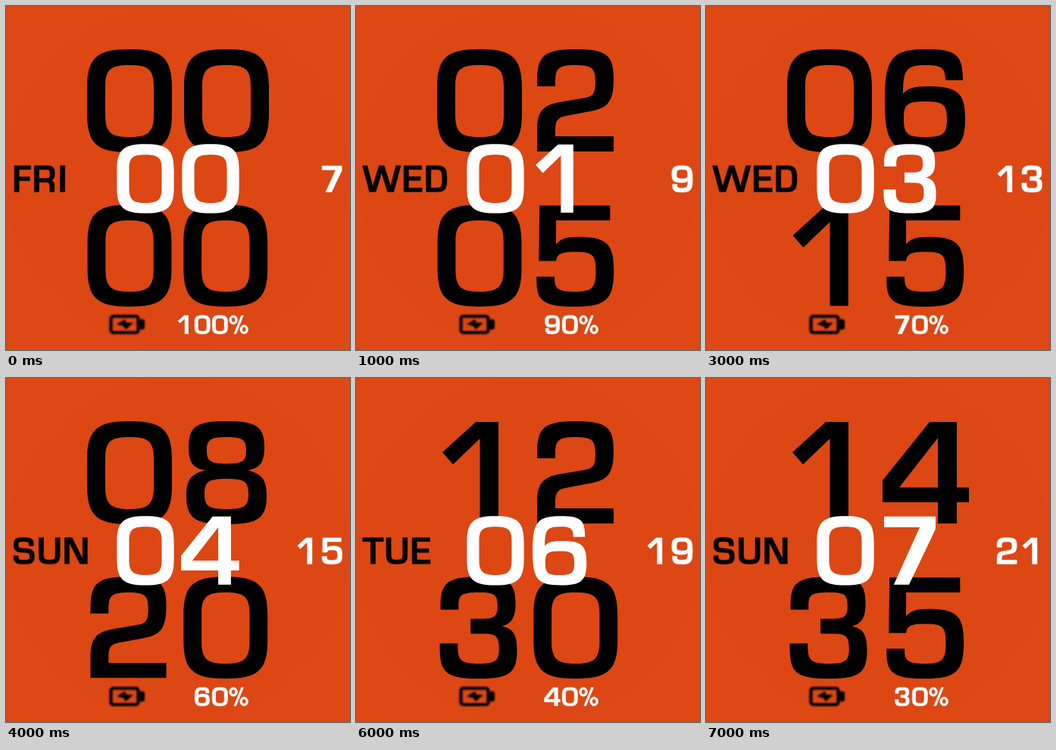
An HTML page with a canvas that plays this animation: 454x454 px, repeating every 8000 ms.

```html
<!DOCTYPE html>
<html lang="en">
<head>
<meta charset="utf-8">
<title>Watch face</title>
<style>
  html, body { margin: 0; height: 100%; overflow: hidden; background: #de4814; }
  canvas { display: block; }
</style>
</head>
<body>
<canvas id="face" width="454" height="454" role="img"></canvas>
<script>
const canvas = document.getElementById('face');
const ctx = canvas.getContext('2d');

// Glyph outlines: cap height 134, default advance 128.
const outlines = {
  0: 'M64-1C107-1 120 10 120 50V84C120 124 107 135 64 135C21 135 8 124 8 84V50C8 10 21-1 64-1ZM64 20C40 20 32 25 32 48V86C32 109 40 115 64 115C88 115 96 109 96 86V48C96 25 88 20 64 20Z',
  1: 'M59 0H89V134H64.5V22L29 56 15 40Z',
  2: 'M12 48V42C12 8 20-1 63-1C104-1 113 7 113 38C113 70 104 77 82 81L50 87C39 89 36 94 36 105V114H113V134H12V106C12 82 19 73 41 69L76 63C86 61 89 57 89 42C89 24 84 20 63 20C40 20 36 24 36 43V48Z',
  3: 'M12 43V38C12 8 20-1 63-1C103-1 112 7 112 35C112 53 107 62 94 65C109 68 114 77 114 97C114 127 104 135 63 135C20 135 11 127 11 94V88H35V92C35 111 40 115 63 115C85 115 90 111 90 95C90 79 86 75 70 75H52V55H70C84 55 88 51 88 38C88 23 84 20 63 20C40 20 36 23 36 38V43Z',
  4: 'M68 0H104V86.5H120V106H104V134H79V106H6V77ZM79 21L28 86.5H79Z',
  5: 'M16 0H110V20H38V52C43 45 51 42 68 42C104 42 115 50 115 86C115 126 105 135 63 135C21 135 12 127 12 100V95H36V97C36 111 41 115 63 115C86 115 91 110 91 88C91 66 87 62 64 62C45 62 40 64 38 74H15Z',
  6: 'M89 40C89 24 84 20 64 20C38 20 33 25 33 58C38 51 47 48 66 48C106 48 115 57 115 91C115 126 105 135 64 135C19 135 9 124 9 67C9 10 19-1 64-1C103-1 112 6 112 40ZM62 68C38 68 34 72 34 91C34 111 39 115 62 115C86 115 91 111 91 91C91 72 86 68 62 68Z',
  7: 'M12 0H113V25L61 134H31L82 21H12Z',
  8: 'M64-1C104-1 114 6 114 34C114 52 109 61 92 64C111 68 117 77 117 97C117 127 106 135 64 135C22 135 11 127 11 97C11 77 17 68 36 64C19 61 14 52 14 34C14 6 24-1 64-1ZM64 20C43 20 38 23 38 38C38 52 43 55 64 55C85 55 90 52 90 38C90 23 85 20 64 20ZM64 75C40 75 35 79 35 95C35 111 40 115 64 115C88 115 93 111 93 95C93 79 88 75 64 75Z',
  9: 'M37 94C37 110 42 114 62 114C88 114 93 109 93 76C88 83 79 86 60 86C20 86 11 77 11 43C11 8 21-1 62-1C107-1 117 10 117 67C117 124 107 135 62 135C23 135 14 128 14 94ZM64 66C88 66 92 62 92 43C92 23 87 19 64 19C40 19 35 23 35 43C35 62 40 66 64 66Z',
  '%': 'M4 32a30 33 0 1 0 60 0a30 33 0 1 0-60 0ZM20 32a14 18 0 1 0 28 0a14 18 0 1 0-28 0ZM82 102a30 33 0 1 0 60 0a30 33 0 1 0-60 0ZM98 102a14 18 0 1 0 28 0a14 18 0 1 0-28 0ZM92 0H108L54 134H38Z',
  D: 'M12 0H64C108 0 118 12 118 67C118 122 108 134 64 134H12ZM36 20V114H62C88 114 94 108 94 67C94 26 88 20 62 20Z',
  E: 'M12 0H103V20H36V56H97V76H36V114H105V134H12Z',
  F: 'M12 0H96V20H36V57H90V77H36V134H12Z',
  I: 'M12 0H36V134H12Z',
  N: 'M12 0H50L104 108V0H128V134H90L36 26V134H12Z',
  R: 'M12 0H74C106 0 116 8 116 38C116 64 111 72 94 75C110 78 115 85 115 104V134H91V109C91 90 87 85 70 85H36V134H12ZM36 20V65H72C88 65 92 61 92 42C92 23 88 20 72 20Z',
  S: 'M110 42H87V38C87 23 82 20 60 20C36 20 32 23 32 36C32 52 38 54 62 55C104 57 114 64 114 96C114 127 104 135 61 135C18 135 8 127 8 98V92H32V97C32 112 37 115 61 115C86 115 90 112 90 97C90 80 86 77 61 76C18 74 9 68 9 37C9 6 18-1 60-1C101-1 110 7 110 36Z',
  T: 'M3 0H109V20H68V134H44V20H3Z',
  U: 'M12 0H36V82C36 109 41 114 66 114C91 114 96 109 96 82V0H120V84C120 126 108 135 66 135C24 135 12 126 12 84Z',
  W: 'M2 0H27L54 106 87 0H113L146 106 173 0H198L162 134H130L100 36 70 134H38Z'
};
const glyphs = {};
for (const key in outlines) glyphs[key] = new Path2D(outlines[key]);
const advances = { '%': 148, D: 128, E: 114, F: 102, I: 48, N: 140, R: 132, S: 125, T: 112, U: 132, W: 202 };
const advance = c => advances[c] || 128;

// align: 0 = left, 0.5 = centre, 1 = right; weight thickens small text
function write(text, x, top, scale, color, align, weight = 0) {
  const width = [...text].reduce((sum, c) => sum + advance(c), 0);
  ctx.save();
  ctx.translate(x - width * scale * align, top);
  ctx.scale(scale, scale);
  ctx.fillStyle = ctx.strokeStyle = color;
  ctx.lineWidth = weight;
  for (const c of text) {
    ctx.fill(glyphs[c], 'evenodd');
    if (weight) ctx.stroke(glyphs[c]);
    ctx.translate(advance(c), 0);
  }
  ctx.restore();
}

function background() {
  ctx.fillStyle = '#de4814';
  ctx.fillRect(0, 0, 454, 454);
  ctx.fillStyle = '#dc4714';
  ctx.beginPath();
  ctx.arc(227, 227, 226, 0, 2 * Math.PI);
  ctx.fill();
}

function battery() {
  ctx.save();
  ctx.filter = 'blur(1px)';
  ctx.strokeStyle = ctx.fillStyle = '#000';
  ctx.lineWidth = 4.2;
  ctx.beginPath();
  ctx.roundRect(138.5, 409.5, 36, 21.5, 3);
  ctx.stroke();
  ctx.beginPath();
  ctx.roundRect(175, 413.5, 8, 13.5, 3);
  ctx.fill();
  ctx.fill(new Path2D('M146 420L157 413.5L159 418H168L158 427L155 422.5Z'));
  ctx.restore();
}

const pad = n => String(n).padStart(2, '0');
const dayNames = ['SUN', 'MON', 'TUE', 'WED', 'THU', 'FRI', 'SAT'];

// Each step moves one month and two days on.
function draw(step) {
  const date = new Date(2022, step, 7 + 2 * step);
  const day = dayNames[date.getDay()];
  const hours = pad(2 * step), minutes = pad(5 * step), seconds = pad(step);
  const number = String(date.getDate());
  const charge = 100 - 10 * step + '%';

  background();
  write(hours, 227, 58, 1, '#000', 0.5);
  write(minutes, 226.4, 263.2, 0.99, '#000', 0.5);
  write(seconds, 227, 182.8, 0.672, '#fff', 0.5);
  write(day, 8, 210.7, 0.258, '#000', 0, 2);
  write(number, 447, 210.9, 0.258, '#fff', 1, 2);
  write(charge, 320.7, 408.4, 0.181, '#fff', 1, 3);
  battery();
  canvas.setAttribute('aria-label', `${hours}:${minutes}:${seconds} ${day} ${number}, ${charge}`);
}

let shown = -1;
function tick() {
  const step = Math.floor(performance.now() / 1000) % 8;
  if (step !== shown) draw(shown = step);
  requestAnimationFrame(tick);
}
tick();
</script>
</body>
</html>
```
